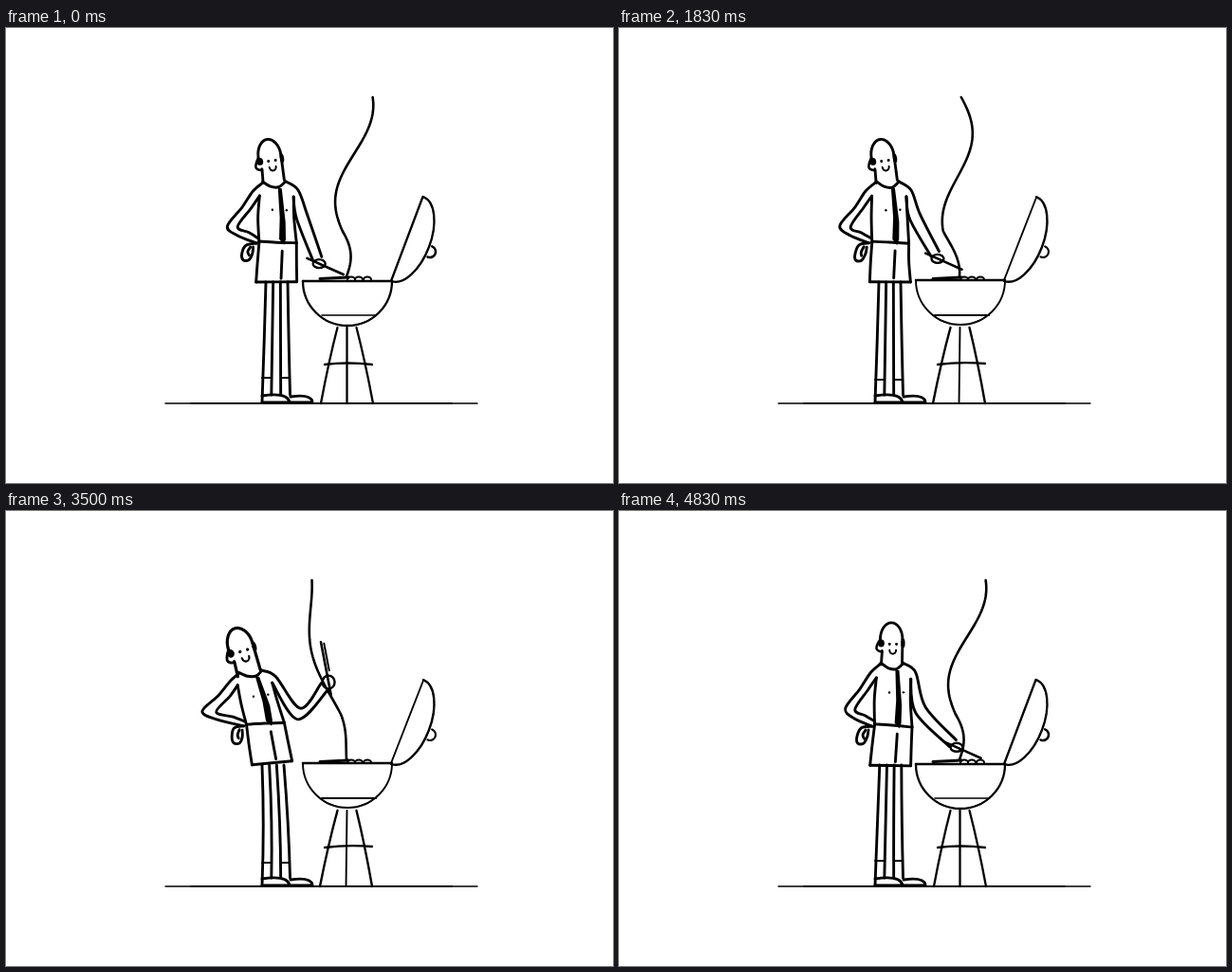
An HTML page with a canvas for the animation above (4920 ms loop, 640 px wide and 480 px high).

```html
<!DOCTYPE html>
<html lang="en">
<head>
<meta charset="utf-8">
<title>Barbecue</title>
<style>
html, body { margin: 0; width: 100%; height: 100%; overflow: hidden; background: #fff; }
canvas { display: block; }
</style>
</head>
<body>
<canvas id="stage" width="640" height="480"></canvas>
<script>
const ctx = document.getElementById('stage').getContext('2d');
const LOOP = 4920, STEP = 1000 / 6, LAST = 29;
const BODY_PEN = 2.9;

const pts = s => s.split(' ').map(p => p.split(',').map(Number));
const lerp = (a, b, t) => a + (b - a) * t;
const mix = (a, b, t) => a.map((v, i) => lerp(v, b[i], t));

// Value at step k between [step, value] keys
function track(keys, k) {
  const i = Math.max(1, keys.findIndex(p => p[0] >= k));
  const [a, b] = [keys[i - 1], keys[i]];
  return lerp(a[1], b[1], (k - a[0]) / (b[0] - a[0]));
}

const LEAN = pts('0,0 18,0 19,0.4 20,1 27,1 28,0.5 29,-0.2');
const CREST = pts('0,85 8,-180 17,-450 21,-515 26,-750 29,-865');
const DRIFT = pts('0,12 8,-10 13,0 17,0 21,-45 26,-10 29,12');

// Smooth stroke through the points
function curve(p, width = BODY_PEN) {
  ctx.lineWidth = width;
  ctx.beginPath();
  ctx.moveTo(...p[0]);
  for (let i = 0; i < p.length - 1; i++) {
    const a = p[i - 1] || p[i], b = p[i], c = p[i + 1], d = p[i + 2] || c;
    ctx.bezierCurveTo(b[0] + (c[0] - a[0]) / 6, b[1] + (c[1] - a[1]) / 6,
      c[0] - (d[0] - b[0]) / 6, c[1] - (d[1] - b[1]) / 6, ...c);
  }
  ctx.stroke();
}

function line(x1, y1, x2, y2, width = BODY_PEN) {
  curve([[x1, y1], [x2, y2]], width);
}

function bow(x1, y1, cx, cy, x2, y2, width = BODY_PEN) {
  ctx.lineWidth = width;
  ctx.beginPath();
  ctx.moveTo(x1, y1);
  ctx.quadraticCurveTo(cx, cy, x2, y2);
  ctx.stroke();
}

function arc(x, y, rx, ry, turn, from, to, width) {
  ctx.lineWidth = width;
  ctx.beginPath();
  ctx.ellipse(x, y, rx, ry, turn, from, to);
  ctx.stroke();
}

function dot(x, y, rx, ry = rx) {
  ctx.beginPath();
  ctx.ellipse(x, y, rx, ry, 0, 0, Math.PI * 2);
  ctx.fill();
}

// Each redrawing swaps which lines are heavy and which are light.
function drawGrill(version) {
  const bold = [2.3, 2.8, 1.9][version];
  const light = [2.3, 1.5, 2.4][version];
  const shift = version === 2 ? -1 : 0;
  const rim = 267 + shift, ground = 396 - (version === 1 ? 0.7 : 0);

  line(168, ground, 497, ground, 1.3);
  line(195, ground, 470, ground, 2.1);

  line(313, rim, 407, rim, 2.5);
  arc(360, rim, 47, 47, 0, 0, Math.PI, bold);
  line(333, 303, 390, 303, version === 2 ? 2.2 : 1.6);

  line(406, rim, 439.5, 178 - shift * 2, bold);
  arc(423, 222.5, 47.5, 24.5, Math.atan2(-89, 34), 0, Math.PI, light);
  arc(447, 236, 6, 6, 0, -1.2, 2, bold + 0.2);

  for (const side of [-1, 0, 1]) {
    const top = 359.5 + side * 10, foot = 359.5 + side * 27.5 + shift;
    bow(top, 316, lerp(top, foot, 0.45) + side, 350, foot, 396, side ? light : bold);
  }
  bow(336, 355, 360, 352, 386, 355 + shift, 2.3);

  line(331, 264.5, 361, 263, 3);
  for (const x of [364, 372, 381]) arc(x, 265.5, 4, 3, 0, Math.PI, Math.PI * 2, 2);
}

// A wave that climbs from the food, with a small break that climbs along
function drawSmoke(k) {
  const crest = track(CREST, k), drift = track(DRIFT, k);
  const size = Math.abs(drift) > 30 ? 10 : 17;
  const gap = (((crest - 41) % 190) + 190) % 190;
  ctx.lineWidth = 2.6;
  ctx.beginPath();
  for (let y = 73; y <= 262; y += 3) {
    const height = (262 - y) / 190;
    const wave = Math.cos((y - crest) / 190 * Math.PI * 2);
    const x = 359 + drift * height + size * Math.min(1, height * 4) * wave;
    if (Math.abs(y - gap) < 1.5) ctx.moveTo(x, y);
    else ctx.lineTo(x, y);
    if (y + 3 - gap >= -1.5 && y + 3 - gap < 1.5) ctx.moveTo(x, y);
  }
  ctx.stroke();
}

// Upper body lines when standing straight; leaning bends them.
const TORSO = [
  '267,177 266,200 267,226', '303,178 304,200 306,227', '267,225 285,226 306,227',
  '267,226 265,248 264,268', '264,268 307,268', '306,227 306,246 307,268',
  '291,235 290,264', '271,162 279,167 288,168 295,162',
  '271,163 260,172 249,189 233,209 244,219 264,227',
  '267,177 258,190 244,210 256,216 266,222',
  '264,227 253,229 249,238 250,245 256,245 260,238 261,231', '258,231 255,236 256,240'
].map(pts);
const TIE = pts('287,169 291,169 295,205 295,223 293,229 288,223 289,200');

function bend([x, y], lean) {
  const elbow = y < 222 ? 0.35 * Math.max(0, 262 - x) : 0;
  return [
    x - lean * (5 + 0.193 * (268 - y) + elbow),
    y + lean * (0.14 * Math.max(0, 226 - y) - 0.1 * Math.max(0, x - 267))
  ];
}

function drawLegs(lean, version) {
  for (let i = 0; i < 4; i++) {
    const hip = lerp(274, 297, i / 3) - lean * 4;
    const foot = lerp(270, 299.5, i / 3);
    bow(hip, 268, lerp(hip, foot, 0.4) + lean * 2.5, 330, foot, i ? 387 : 395);
  }
  const sock = 369 + version;
  line(270, sock, 280, sock, 2);
  line(291, sock, 299, sock, 2);
  bow(270, 388, 297, 384, 299, 395);
  bow(300, 389, 321, 386, 323, 394);
  line(270, 395, 322, 395);
}

function drawTorso(lean, version) {
  const place = p => {
    const [x, y] = bend(p, lean);
    return [x + 0.4 * Math.sin(y + version * 2), y + 0.3 * Math.sin(x + version * 2)];
  };
  for (const p of TORSO) curve(p.map(place));
  ctx.beginPath();
  for (const p of TIE) ctx.lineTo(...place(p));
  ctx.fill();
  for (const x of [281, 296]) dot(...place([x, 192]), 1.2);
}

function drawHead(lean) {
  const size = 1 + 0.1 * lean;
  ctx.save();
  ctx.translate(282 - 26 * lean, 162 + 9 * Math.max(0, lean));
  ctx.rotate(lean < 0 ? 0 : -0.15 - 0.15 * lean);
  ctx.scale(size, size);
  arc(0, -27, 12, 18, 0, Math.PI, Math.PI * 2, BODY_PEN);
  line(12, -27, 11.5, 0);
  curve(pts('-12,-27 -15,-22 -16,-17 -12,-14 -10,-15'), 2.6);
  line(-10, -14, -11, 0);
  arc(1.5, -15.5, 3.5, 4, 0, 0, Math.PI, 2);
  dot(-2, -22, 1.5);
  dot(5.5, -22, 1.5);
  dot(-11, -23, 3.5, 4);
  dot(12.5, -23, 2.2, 5);
  ctx.restore();
}

// Elbow and wrist for near stir, far stir and raised
const ARM = { near: [312, 199, 328, 243], far: [318, 210, 352, 245], raised: [309, 214, 336, 185] };

function drawArm(k, lean) {
  const raise = Math.max(0, lean);
  const reach = 0.5 + 0.7 * Math.cos((k - 1.5) * Math.PI / 2);
  const lift = 6 * Math.sin(k * Math.PI / 16) * (1 - reach) * (1 - raise);
  const sway = k % 2 ? 0 : -4 * raise;
  const [ex, ey, wx0, wy0] = mix(mix(ARM.near, ARM.far, reach), ARM.raised, raise);
  const wx = wx0 + lift + sway, wy = wy0 - lift;

  const shoulder = bend([295, 162], lean);
  const upper = Math.atan2(wy - shoulder[1], wx - shoulder[0]);
  const fore = Math.atan2(wy - ey, wx - ex);
  const edge = side => [
    [ex + side * 6 * Math.sin(upper), ey - side * 6 * Math.cos(upper)],
    [wx + side * 5 * Math.sin(fore), wy - side * 5 * Math.cos(fore)]
  ];
  curve([shoulder, bend([308, 171], lean), ...edge(1)]);
  curve([bend([303, 178], lean), ...edge(-1)]);

  const hx = wx + 6 * Math.cos(fore), hy = wy + 6 * Math.sin(fore);
  arc(hx, hy, 6.5, lerp(4.5, 7, raise), 0, 0, Math.PI * 2, 2.4);

  ctx.save();
  ctx.translate(hx, hy);
  ctx.rotate(lerp(0.42, -1.76, raise));
  line(-14, 0, lerp(28, 43, raise), 0, 2.6);
  if (raise > 0.5) line(12, 3, 41, 3, 2);
  ctx.restore();
}

function draw(k) {
  ctx.fillStyle = '#fff';
  ctx.fillRect(0, 0, 640, 480);
  ctx.fillStyle = ctx.strokeStyle = '#000';
  ctx.lineCap = ctx.lineJoin = 'round';
  const version = (k - Math.max(0, Math.floor(k / 9) - 1)) % 3;
  const lean = track(LEAN, k);
  drawGrill(version);
  drawSmoke(k);
  drawLegs(lean, version);
  drawTorso(lean, version);
  drawHead(lean);
  drawArm(k, lean);
}

function tick() {
  const t = performance.now() % LOOP;
  draw(Math.min(LAST, Math.floor((t + 4) / STEP)));
  requestAnimationFrame(tick);
}
tick();
</script>
</body>
</html>
```
